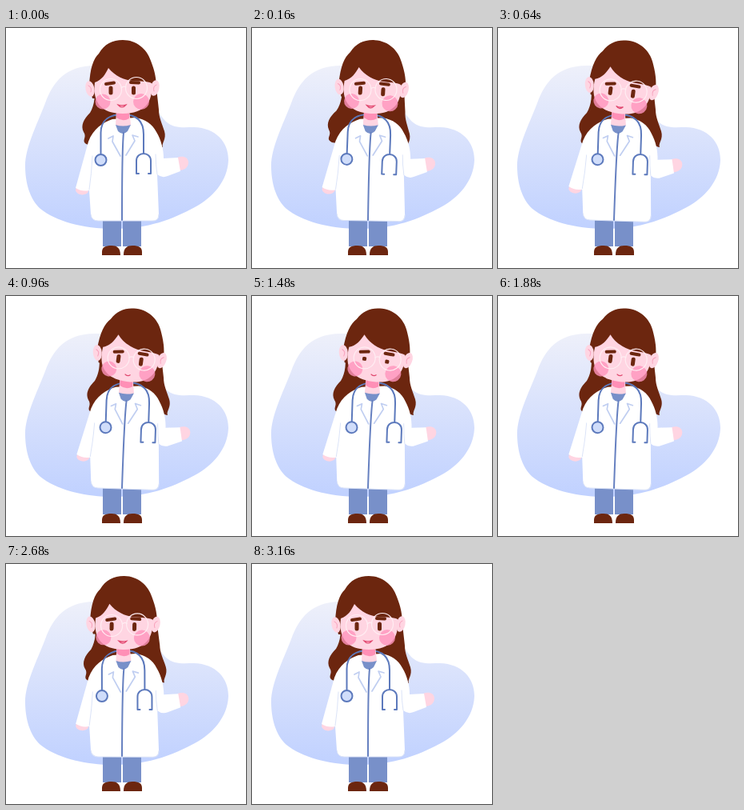
An HTML page for the animation above (3.2 s loop, 300 by 300 pixels).

```html
<!DOCTYPE html>
<html>
<head>
<meta charset="utf-8">
<style>
html, body { margin: 0; width: 100%; height: 100%; overflow: hidden; background: #fff }
svg { display: block; width: 100vw; height: 100vh }
.line { fill: none; stroke-linecap: round; stroke-linejoin: round }
.hair { fill: #6c260f }
.skin { fill: #ffd5e2 }
.cloth { fill: #7890c9 }
</style>
</head>
<body>
<svg viewBox="0 0 300 300">
  <defs>
    <linearGradient id="sky" x2="0" y2="1">
      <stop offset="0" stop-color="#eef0fa"/>
      <stop offset="1" stop-color="#c0d1ff"/>
    </linearGradient>
  </defs>
  <path fill="url(#sky)" d="M24 172C24 150 38 122 49 94C59 66 76 46 114 47C160 47 180 95 200 117C210 126 222 124 235 124C262 125 278 142 278 165C277 192 258 212 236 224C208 239 178 251 135 251C95 251 62 241 43 226C29 213 24 192 24 172Z"/>

  <path id="hair" class="hair" d="M110 66C112 84 111 96 105 106C97 114 93 122 97 130C101 136 96 139 98 143C102 148 109 146 114 143L146 150L184 139C188 145 192 149 196 149C194 144 201 139 198 129C195 119 191 112 191 102L187 66Z"/>

  <path class="cloth" d="M121 232H144V273H121ZM146 232H169V273H146Z"/>
  <path class="hair" d="M120 284V280C120 274 124 272 132 272C139 272 143 275 143 284ZM147 284C147 275 151 272 158 272C166 272 170 274 170 280V284Z"/>

  <g id="torso">
    <path class="skin" d="M88 198H103V204C101 210 89 210 87 203ZM214 162C220 159 228 161 228 168C228 175 222 178 215 178Z"/>
    <path fill="#fff" d="M133 114C121 118 109 126 103 142L87 200Q95 205 104 203L106 233Q107 241 115 241H182Q191 242 191 233L189 183Q195 188 202 185L218 179L215 162L197 163C197 152 194 140 188 130C183 120 174 114 162 112Z"/>
    <path class="line" stroke="#dce4f8" d="M108 160Q107 182 104 202M106 233Q107 241 115 241H182Q191 242 191 233M187 158Q187 170 189 183"/>
    <g id="scope" class="line" stroke="#5c79bc" stroke-width="2">
      <path d="M118.500 158V131C118.500 114 131 108 146 108C163 108 172 116 172 133V157M166 182H163V166C163 154 181 154 181 166V182H178"/>
      <circle cx="118.500" cy="165" r="7" fill="#d0ddfa"/>
    </g>
    <path class="skin" d="M138 102H154L156 121Q146 126 137 121Z"/>
    <path fill="#ff8fb6" d="M138 102H154V113Q146 118 138 112Z"/>
    <path class="cloth" d="M137 121Q146 124 156 121L152 129Q146 135 140 129Z"/>
    <path class="line" stroke="#c0cef1" stroke-width="1.700" d="M128 138L134 135L133 142L143 160M165 136L158 134L161 141L150 159"/>
    <path class="line" stroke="#6680c0" stroke-width="2" d="M147 131C145 150 145 200 145 240"/>

    <g id="head">
      <path class="hair" d="M104 72C105 50 109 39 116 32C123 20 133 15 146 15C163 15 176 26 181 41C186 54 188 62 188 78L184 88H108Z"/>
      <g class="skin">
        <ellipse cx="105" cy="76" rx="5.500" ry="10" transform="rotate(-12 105 76)"/>
        <ellipse cx="186" cy="75" rx="5.500" ry="10" transform="rotate(12 186 75)"/>
      </g>
      <path class="line" stroke="#f7a1bc" d="M103 72Q108 74 106 80M188 71Q183 73 185 79"/>
      <path class="skin" d="M111 68C120 65 124 58 128 50C136 60 148 65 158 66C168 67 176 66 182 69C184 92 174 107 146 107C119 107 108 93 111 68Z"/>
      <g id="face">
        <g fill="#ff95bd" opacity=".8">
          <circle cx="121" cy="92" r="9.500"/>
          <circle cx="169" cy="92" r="10"/>
        </g>
        <g class="line" stroke="#ffedf2" stroke-width="1.200">
          <circle cx="131" cy="77" r="13.500"/>
          <circle cx="163" cy="75" r="13.500"/>
          <path d="M144 75Q147 72 150 74"/>
        </g>
        <path class="line" stroke="#6c260f" stroke-width="4" d="M125 70L135 68.500M156 68L166 68.500"/>
        <g id="eyes" class="hair">
          <rect x="128.500" y="72.500" width="5" height="11" rx="2.500"/>
          <rect x="157" y="72.500" width="5" height="11" rx="2.500"/>
        </g>
        <path id="mouth" fill="#ffa9c3" stroke="#e0486f" stroke-width="1.200" stroke-linecap="round"/>
      </g>
    </g>
  </g>
</svg>
<script>
const el = id => document.getElementById(id);
const LOOP = 3200;

function ease(t, from, to) {
  const x = Math.min(1, Math.max(0, (t - from) / (to - from)));
  return x * x * (3 - 2 * x);
}

// Rises from 0 to 1, holds, then returns.
const hold = (t, a, b, c, d) => ease(t, a, b) - ease(t, c, d);
const move = (id, value) => el(id).setAttribute('transform', value);

function draw(now) {
  const t = now % LOOP;
  const tilt = hold(t, 20, 320, 2380, 2760);
  const settle = hold(t, 240, 640, 2420, 2800);
  const lag = tilt - settle;
  const smile = 1 - hold(t, 480, 860, 2160, 2440);
  const blink = hold(t, 1360, 1460, 1480, 1600);

  move('torso', `rotate(${1.9 * tilt} 146 240)`);
  move('head', `rotate(${5.6 * tilt} 147 112)`);
  move('face', `translate(${tilt} ${2 * tilt})`);
  move('hair', `translate(${6 * settle} 0) rotate(${7.5 * lag} 147 112)`);
  move('scope', `translate(${3.5 * settle} 0) rotate(${3 * lag} 147 112)`);
  move('eyes', `translate(0 78) scale(1 ${1 - 0.55 * blink}) translate(0 -78)`);

  const w = 3.5 + 1.5 * smile;
  el('mouth').setAttribute('d',
    `M${145 - w} 96Q145 ${99 + 3 * smile} ${145 + w} 96Q145 ${99 - 1.5 * smile} ${145 - w} 96Z`);
  requestAnimationFrame(draw);
}
requestAnimationFrame(draw);
</script>
</body>
</html>
```
